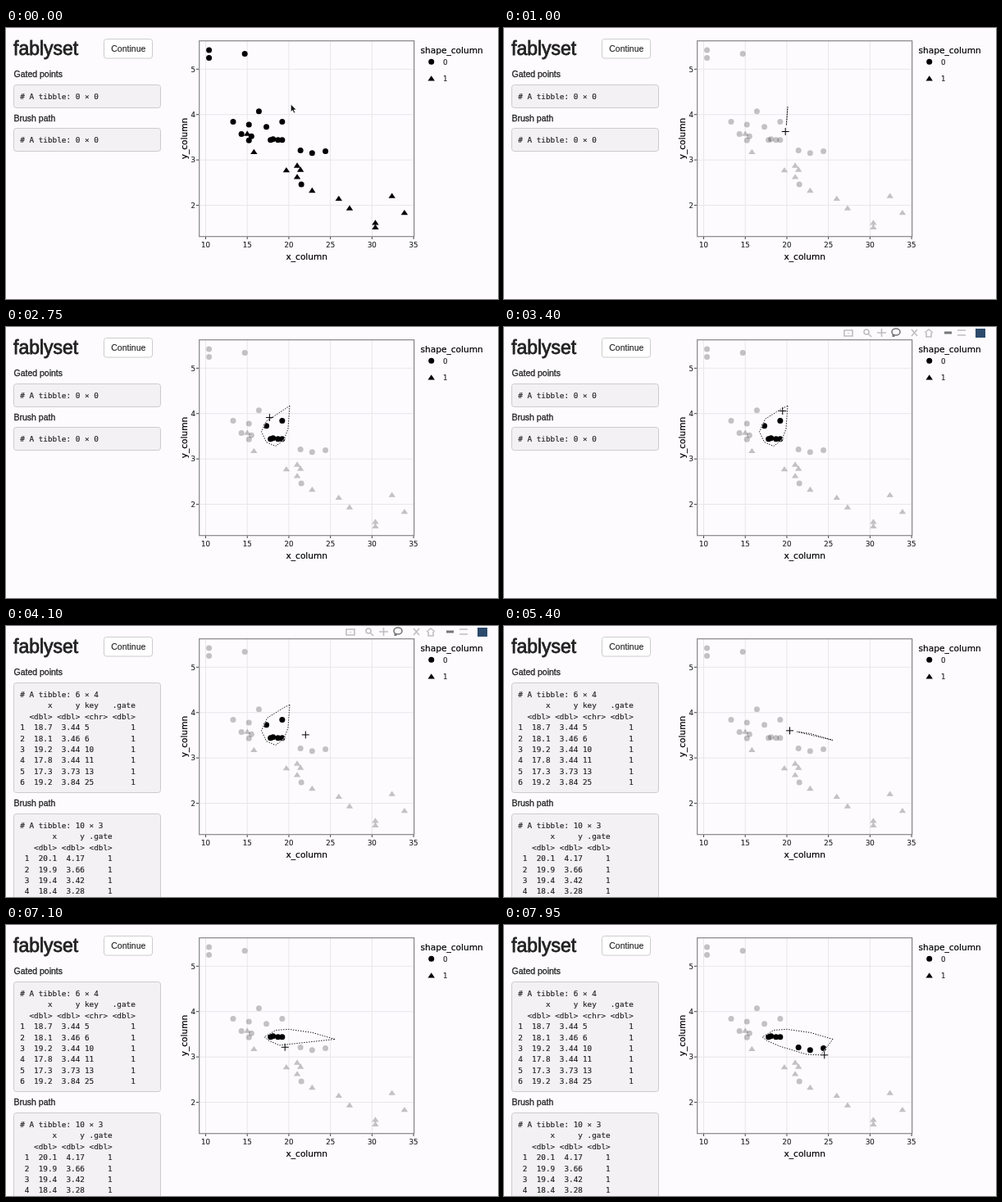
Write an HTML page that moves like this. It is 600 by 331 pixels and loops after 8 s.

```html
<!DOCTYPE html>
<html lang="en">
<head>
<meta charset="utf-8">
<style>
html, body { margin: 0; width: 100%; height: 100%; overflow: hidden; background: #fdfbfe; }
svg { display: block; font: 10.5px "Liberation Sans", Arial, sans-serif; fill: #222; }
text { stroke: currentColor; stroke-width: .15; color: #222; }
.title { font-size: 23px; stroke-width: .8; }
.label { stroke-width: .3; }
.box { fill: #f3f1f4; stroke: #ccc; }
.code { font: 9.36px "DejaVu Sans Mono", monospace; white-space: pre; }
.tick, .axis { font: 8.6px "DejaVu Sans", sans-serif; }
.axis { font-size: 10.6px; fill: #000; color: #000; stroke-width: .2; }
.mid { text-anchor: middle; }
.end { text-anchor: end; }
.gate { fill: none; stroke: #fff; }
.gate.dots { stroke: #000; stroke-dasharray: 1.3 1.7; }
#icons { fill: none; stroke: #bfbdc0; stroke-width: 1.6; }
#icons .on { stroke: #777; }
</style>
</head>
<body>
<svg width="600" height="331" viewBox="0 0 600 331">
  <text class="title" x="9" y="33">fablyset</text>
  <rect x="119.5" y="13.5" width="59" height="23.5" rx="3" fill="#fff" stroke="#ccc"/>
  <text class="mid" x="149.3" y="29.3">Continue</text>
  <text class="label" x="9.5" y="60">Gated points</text>
  <g id="before"></g>
  <g id="after"></g>
  <g id="plot"></g>
  <g id="icons">
    <path d="M415 4h10v7h-10z M420 7v1 M444 8l4 4 M455 7h11 M460.5 2v10 M497 3l7 8 M504 3l-7 8 M513 7l5-4 5 4 M515 7v5h6v-5 M553 4h10 M553 10h10"/>
    <circle cx="442" cy="6" r="3"/>
    <ellipse class="on" cx="478" cy="6" rx="5" ry="4"/>
    <path class="on" d="M475 9v3 M537 7h9" stroke-width="3"/>
    <rect x="575" y="2" width="12" height="11" fill="#2c4a6c" stroke="none"/>
  </g>
  <path class="gate"/>
  <path class="gate dots"/>
  <path id="cross" d="M-4.5 0h9M0-4.5v9" stroke="#000"/>
  <path id="arrow" d="M0 0v9.5l2.2-2 1.5 3.5 1.7-.8-1.5-3.3h3z" fill="#111" stroke="#fff" stroke-width=".7"/>
</svg>
<script>
const $ = id => document.getElementById(id);
const X = v => 142.1 + 10.142 * v, Y = v => 327.4 - 55.42 * v;
const range = (from, to, step = 1) =>
  Array.from({ length: (to - from) / step + 1 }, (_, i) => from + i * step);

// The plotted sample; table keys are its row numbers
const data = [
  [21, 2.62], [21, 2.87], [22.8, 2.32], [21.4, 3.21], [18.7, 3.44], [18.1, 3.46], [14.3, 3.57], [24.4, 3.19],
  [22.8, 3.15], [19.2, 3.44], [17.8, 3.44], [16.4, 4.07], [17.3, 3.73], [15.2, 3.78], [10.4, 5.25], [10.4, 5.42],
  [14.7, 5.34], [32.4, 2.2], [30.4, 1.61], [33.9, 1.83], [21.5, 2.46], [15.5, 3.52], [15.2, 3.43], [13.3, 3.84],
  [19.2, 3.84], [27.3, 1.93], [26, 2.14], [30.4, 1.51], [15.8, 3.17], [19.7, 2.77], [15, 3.57], [21.4, 2.78]];
const isRound = i => i > 2 && i < 17 || i > 19 && i < 25;

// Pointer moves in plot units, one point per step
const moves = [
  { start: 600, step: 350, drawn: true, path: [[20.1, 4.17], [19.9, 3.66], [19.4, 3.42], [18.4, 3.28],
    [17.3, 3.37], [16.7, 3.6], [17.4, 3.88], [19.3, 4.1]] },
  { start: 3350, step: 375, path: [[19.3, 4.1], [20.7, 3.78], [22, 3.51], [25.53, 3.39]] },
  { start: 4650, step: 400, drawn: true, path: [[25.53, 3.39], [22.86, 3.535], [20, 3.61], [18.43, 3.59],
    [17.05, 3.44], [17.64, 3.355], [19.12, 3.237], [22.37, 3.057], [24.15, 3.042], [25.6, 3.04]] }];
const lag = 120;

// Points of a move passed by time t, ending at the current place
function trail({ start, step, path }, t) {
  const u = Math.min(Math.max((t - start) / step, 0), path.length - 1);
  const i = Math.floor(u), [x, y] = path[i], [x2, y2] = path[i + 1] || path[i];
  return [...path.slice(0, i + 1), [x + (x2 - x) * (u - i), y + (y2 - y) * (u - i)]];
}
function inside([x, y], area) {
  let hit = false;
  area.forEach(([ax, ay], i) => {
    const [bx, by] = area[(i + 1) % area.length];
    if ((ay > y) !== (by > y) && x < ax + (y - ay) / (by - ay) * (bx - ax)) hit = !hit;
  });
  return hit;
}

const text = (cls, x, y, s, extra = "") => `<text class="${cls}" x="${x}" y="${y}" ${extra}>${s}</text>`;
const mark = (x, y, round) => round
  ? `<circle cx="${x}" cy="${y}" r="3.5" fill="#000"/>`
  : `<path d="M${x - 4.2} ${y + 2.3}h8.4l-4.2-6.3z" fill="#000"/>`;

function panel(y, height, lines) {
  return `<rect class="box" x="9.5" y="${y}" width="179" height="${height}" rx="3"/>` +
    lines.map((s, i) => text("code", 17.2, y + 17.6 + i * 13.37, s.replace(/</g, "&lt;"))).join("");
}
const brushLabel = y => text("label", 9.5, y, "Brush path");
const cells = ([x, y]) => `  ${x.toFixed(1)}  ${y.toFixed(2)}`;
const stroke = moves[0].path;
const gated = data.map((p, i) => [p, i + 1]).filter(([p]) => inside(p, stroke));
const empty = ["# A tibble: 0 × 0"];

$("before").innerHTML = panel(69.5, 28, empty) + brushLabel(114) + panel(122.5, 28, empty);
$("after").innerHTML = panel(69.5, 134, [
  "# A tibble: 6 × 4",
  "      x     y key   .gate",
  "  <dbl> <dbl> <chr> <dbl>",
  ...gated.map(([p, key], i) => i + 1 + cells(p) + " " + String(key).padEnd(10) + 1)
]) + brushLabel(220) + panel(229.5, 190, [
  "# A tibble: 10 × 3",
  "       x     y .gate",
  "   <dbl> <dbl> <dbl>",
  ...stroke.map((p, i) => ` ${i + 1}${cells(p)}     1`)]);

const columns = range(10, 35, 5), rows = range(2, 5);
const lines = (d, color) => `<path d="${d.join("")}" stroke="${color}"/>`;
$("plot").innerHTML =
  lines([...columns.map(v => `M${X(v)} 16v238`), ...rows.map(v => `M236 ${Y(v)}h261`)], "#e8e6e9") +
  lines([...columns.map(v => `M${X(v)} 255v3`), ...rows.map(v => `M235 ${Y(v)}h-3`)], "#444") +
  `<rect x="235.7" y="15.7" width="262" height="239" fill="none" stroke="#858585" stroke-width="1.2"/>` +
  columns.map(v => text("tick mid", X(v), 268, v)).join("") +
  rows.map(v => text("tick end", 231, Y(v) + 3.2, v)).join("") +
  text("axis mid", 366.8, 283, "x_column") +
  text("axis mid", 0, 0, "y_column", 'transform="translate(220.500 135) rotate(-90)"') +
  text("axis", 505.5, 31, "shape_column") +
  text("tick", 533, 44.7, 0) + text("tick", 533, 65.3, 1) +
  mark(518.7, 41.3, true) + mark(518.7, 62.2, false) +
  data.map(([x, y], i) => `<g class="point">${mark(X(x), Y(y), isRound(i))}</g>`).join("");

const points = document.querySelectorAll(".point"), gates = document.querySelectorAll(".gate");
const show = (el, on) => el.style.display = on ? "" : "none";
const place = (el, x, y) => el.setAttribute("transform", `translate(${x} ${y})`);

function draw(t) {
  const now = moves.findLast(m => t >= m.start) || moves[0];
  const drawn = moves.findLast(m => m.drawn && t >= m.start);
  const area = drawn ? trail(drawn, t - lag) : [];
  const d = drawn ? "M" + area.map(([x, y]) => [X(x), Y(y)]).join("L") + "Z" : "";
  gates.forEach(g => g.setAttribute("d", d));
  points.forEach((p, i) => p.setAttribute("opacity", !drawn || inside(data[i], area) ? 1 : .23));

  show($("before"), t < 3600);
  show($("after"), t >= 3600);
  show($("icons"), t >= 3400 && t < 4650);
  show($("arrow"), t < 400);
  show($("cross"), t >= 400);
  place($("arrow"), 347.3, t < 50 ? 93 : t < 200 ? 93.6 : 94.5);
  const [x, y] = trail(now, t).at(-1);
  place($("cross"), X(x), Y(y));
}
function frame() {
  draw(performance.now() % 8000);
  requestAnimationFrame(frame);
}
frame();
</script>
</body>
</html>
```
